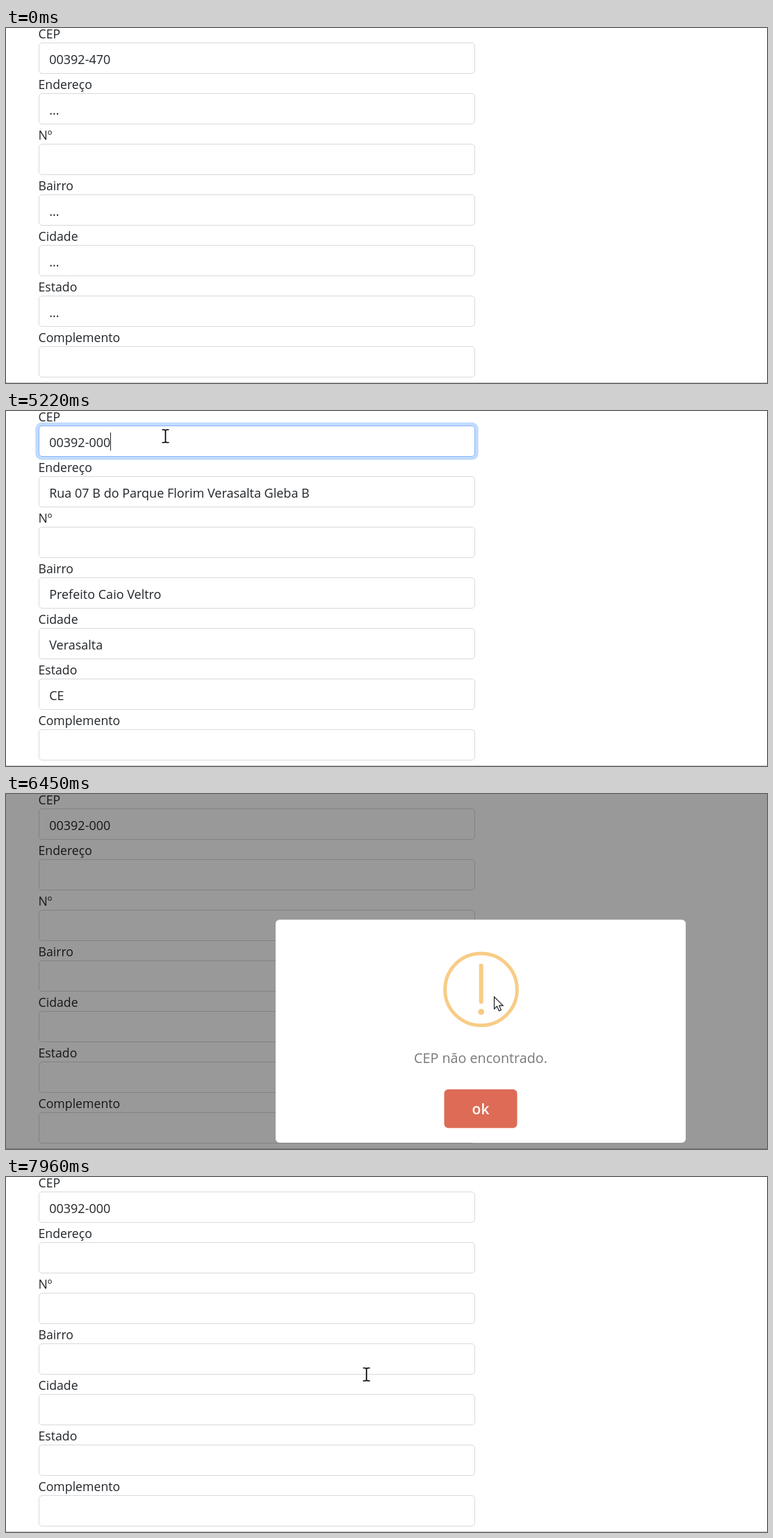
These frames come from a looping animation (1095 px wide and 512 px high, 8 s). An HTML page:

```html
<!DOCTYPE html>
<html lang="pt-BR">
<head>
<meta charset="utf-8">
<title>Busca de CEP</title>
<style>
html, body { margin: 0; width: 100%; height: 100%; overflow: hidden; background: #fff; }
svg { display: block; width: 100%; height: 100%; }
text { font-family: "Open Sans", "Noto Sans", sans-serif; fill: #212529; }
.label { font-size: 17.7px; }
.value { font-size: 18px; }
.box { fill: #fff; stroke: #d6d9dd; }
</style>
</head>
<body>
<svg viewBox="0 0 1095 512" preserveAspectRatio="none">
  <g id="form"></g>
  <rect id="caret" y="31" width="1" height="26" fill="#212529"/>
  <rect y="511" width="1095" height="1" fill="#c9c9c9"/>
  <rect id="shade" width="1095" height="512"/>
  <g id="modal">
    <rect x="402" y="189" width="562" height="306.3" rx="5.5" fill="#fff"/>
    <g id="icon">
      <circle cx="683.5" cy="284.8" r="49.4" fill="none" stroke="currentColor" stroke-width="4.7"/>
      <rect x="680.8" y="249.3" width="5.8" height="55" rx="2.4" fill="currentColor"/>
      <circle cx="683.7" cy="315.4" r="4.2" fill="currentColor"/>
    </g>
    <text x="683" y="385.6" text-anchor="middle" font-size="18.8" style="fill:#797979">CEP não encontrado.</text>
    <rect id="button" x="633" y="422" width="100" height="53" rx="5.5"/>
    <text x="683" y="456.2" text-anchor="middle" font-size="20" font-weight="600" style="fill:#fff">ok</text>
  </g>
  <g id="pointer">
    <path id="arrow" d="M.5 .5V18L4.6 14.2L7.4 20.8L10.4 19.5L7.6 13.1H13.2Z" fill="#fff" stroke="#111" stroke-width="1.1"/>
    <path id="beam" d="M-5 -9H-1.5L0 -8L1.5 -9H5M0 -8.5V8.5M-5 9.5H-1.5L0 8.5L1.5 9.5H5" fill="none" stroke="#000" stroke-width="1.7"/>
    <path id="hand" d="M-2 1.5Q0 -1 2 1.5V9Q4 7 5.6 9.5Q7.6 8 9 10.6Q11 9.5 12 12V17Q11 21 9 24H-1Q-4 20 -8 14.5Q-7 11 -2 14Z" fill="#fff" stroke="#111" stroke-width="1.1"/>
  </g>
  <circle id="spot" r="14" fill="#ff0" opacity=".5"/>
</svg>
<script>
const LOOP = 8000;
const $ = id => document.getElementById(id);
const show = (el, on) => el.setAttribute("display", on ? "inline" : "none");

const labels = ["CEP", "Endereço", "Nº", "Bairro", "Cidade", "Estado", "Complemento"];
const found = ["Rua 07 B do Parque Florim Verasalta Gleba B", "", "Prefeito Caio Veltro", "Verasalta", "CE", ""];
const waiting = ["...", "", "...", "...", "...", ""];
const empty = ["", "", "", "", "", ""];

$("form").innerHTML = labels.map((name, i) => {
  const y = i * 73;
  const ring = i ? "" : `<rect id="ring" x="42.3" y="16.5" width="637.4" height="54" rx="9" fill="#c2dbfe"/>`;
  return `${ring}<text class="label" x="46.5" y="${y + 15}">${name}</text>
    <rect class="box" x="47.5" y="${y + 21.5}" width="627" height="44" rx="4.5"/>
    <text class="value" x="62.2" y="${y + 52}"></text>`;
}).join("");
const values = [...document.querySelectorAll(".value")];
const cepBox = document.querySelector(".box");

const arrow = (x, y) => ["arrow", x, y];
const beam = (x, y) => ["beam", x, y];
const hand = (x, y) => ["hand", x, y];

// Each step changes only the named parts; the rest carries over.
const steps = [
  [0, { cep: "00392-470", fields: waiting, caret: 0, focus: 0, pointer: null, spot: null,
        shade: 0, scale: 0, alpha: 1, button: "#dd6b55" }],
  [260, { fields: found }],
  [400, { pointer: arrow(978, 432) }],
  [460, { pointer: arrow(908, 310) }],
  [530, { pointer: arrow(866, 236) }],
  [1130, { pointer: arrow(640, 142) }],
  [1200, { pointer: arrow(302, 2) }],
  [1270, { pointer: null }],
  [1620, { pointer: arrow(233, 4) }],
  [1690, { pointer: beam(231, 32) }],
  [1750, { pointer: beam(229.5, 36) }],
  [2150, { spot: [228, 36], caret: 150, focus: .06 }],
  [2220, { focus: .7 }],
  [2280, { focus: .95, spot: null }],
  [2340, { focus: 1 }],
  [2670, { caret: 0 }],
  [3200, { caret: 150 }],
  [3530, { cep: "00392-47", caret: 140 }],
  [3750, { cep: "00392-4", caret: 0 }],
  [4080, { cep: "00392-" }],
  [4280, { caret: 121 }],
  [4680, { cep: "00392-0", caret: 130 }],
  [4950, { cep: "00392-00", caret: 140 }],
  [5220, { cep: "00392-000", caret: 150 }],
  [5630, { pointer: beam(292, 60) }],
  [5700, { pointer: beam(478, 178) }],
  [5770, { pointer: beam(646, 268), caret: 0 }],
  [5840, { pointer: arrow(702, 292) }],
  [6100, { spot: [702, 293], focus: .9 }],
  [6170, { focus: .3, fields: waiting }],
  [6240, { focus: 0 }],
  [6310, { fields: empty, scale: .7 }],
  [6380, { shade: .28, scale: .985 }],
  [6450, { shade: .4, scale: 1.05, spot: null }],
  [6510, { scale: .962 }],
  [6580, { scale: .985 }],
  [6650, { scale: 1 }],
  [6790, { pointer: arrow(700, 304) }],
  [6860, { pointer: arrow(693, 338) }],
  [6930, { pointer: arrow(684, 380) }],
  [7000, { pointer: arrow(676, 414) }],
  [7070, { pointer: hand(670, 435), button: "#d46752" }],
  [7140, { pointer: hand(668, 442) }],
  [7340, {}],
  [7480, { spot: [668, 440], button: "#be5c49" }],
  [7550, {}],
  [7620, {}],
  [7690, { spot: null, button: "#d46752", scale: .97, alpha: .9, shade: .36 }],
  [7760, { scale: .75, alpha: .25, shade: .1 }],
  [7830, { scale: 0, shade: 0, pointer: arrow(610, 380) }],
  [7960, { pointer: beam(518.7, 284.5) }]
];

let last = {};
const states = steps.map(([at, change]) => (last = { ...last, ...change, at }));

// The warning sign swings between two ambers, 750 ms each way.
function amber(at) {
  const n = Math.max(0, at - 6310) / 750;
  const p = n % 2 < 1 ? n % 2 : 2 - n % 2;
  const eased = 1 - (1 - p) ** 2;
  return `rgb(248,${Math.round(212 - 25 * eased)},134)`;
}

function draw(s) {
  [s.cep, ...s.fields].forEach((text, i) => { values[i].textContent = text; });
  show($("caret"), s.caret);
  $("caret").setAttribute("x", s.caret);
  $("ring").setAttribute("opacity", s.focus);
  const mix = (a, b) => Math.round(a + (b - a) * s.focus);
  cepBox.style.stroke = `rgb(${mix(214, 134)},${mix(217, 183)},${mix(221, 254)})`;

  $("shade").setAttribute("opacity", s.shade);
  show($("modal"), s.scale);
  $("modal").setAttribute("opacity", s.alpha);
  $("modal").setAttribute("transform", `translate(683 342.2) scale(${s.scale}) translate(-683 -342.2)`);
  $("icon").style.color = amber(s.at);
  $("button").setAttribute("fill", s.button);

  show($("pointer"), s.pointer);
  if (s.pointer) {
    const [kind, x, y] = s.pointer;
    $("pointer").setAttribute("transform", `translate(${x} ${y})`);
    for (const id of ["arrow", "beam", "hand"]) show($(id), id === kind);
  }
  show($("spot"), s.spot);
  if (s.spot) $("spot").setAttribute("transform", `translate(${s.spot})`);
}

const start = performance.now();
let shown = null;
function tick() {
  const t = (performance.now() - start) % LOOP;
  const state = states.filter(s => s.at <= t).pop();
  if (state !== shown) draw(shown = state);
  requestAnimationFrame(tick);
}
tick();
</script>
</body>
</html>
```
